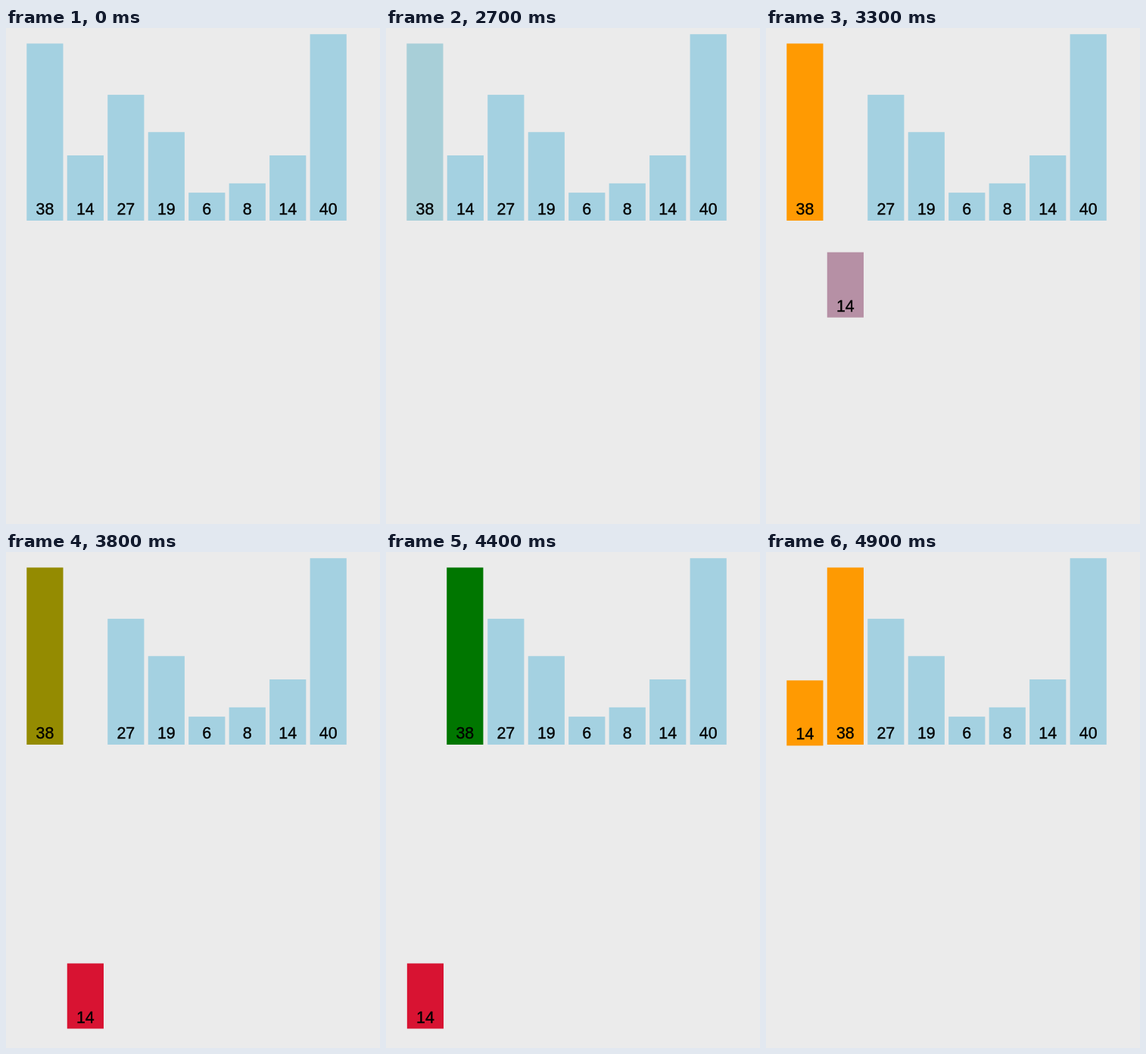
Animation, 494 px wide and 654 px high, one loop 5 s. Source, as an HTML page:

```html
<!DOCTYPE html>
<html lang="en">
<head>
<meta charset="utf-8">
<title>Bar swap</title>
<style>
  html, body { margin: 0; width: 100%; height: 100%; overflow: hidden; background: #ebebeb; }
  svg { display: block; width: 494px; height: 654px; }
  text {
    font: 21.4px "Liberation Sans", Arial, Helvetica, sans-serif;
    text-anchor: middle;
    stroke: #000;
    stroke-width: .35px;
  }
</style>
</head>
<body>
<svg id="stage" viewBox="0 0 494 654"></svg>
<script>
const VALUES = [38, 14, 27, 19, 6, 8, 14, 40];
const LOOP = 5000, TICK = 100, DURATION = 350;
const LEFT = 27.3, STEP = 53.47, WIDTH = 48.2, BASE = 254, UNIT = 6.145, DROP = 374.5;
const BLUE = [164, 209, 225], ORANGE = [255, 154, 2], CRIMSON = [216, 19, 50], GREEN = [0, 118, 0];
const START = { highlight: 2680, drop: 3223, select: 3711, swap: 4096, raise: 4578 };

const svg = document.getElementById('stage');

function add(parent, tag, attrs) {
  const node = document.createElementNS('http://www.w3.org/2000/svg', tag);
  for (const key in attrs) node.setAttribute(key, attrs[key]);
  return parent.appendChild(node);
}

const bars = VALUES.map((value, i) => {
  const group = add(svg, 'g', {});
  const height = value * UNIT;
  const rect = add(group, 'rect', { y: BASE - height, width: WIDTH, height });
  add(group, 'text', { x: WIDTH / 2, y: 246 }).textContent = value;
  const bar = { group, rect };
  place(bar, i, 0, BLUE);
  return bar;
});

function place({ group, rect }, slot, dy, color) {
  group.setAttribute('transform', `translate(${LEFT + slot * STEP} ${dy})`);
  rect.setAttribute('fill', `rgb(${color.map(Math.round)})`);
}

// cubic-bezier(.25, .1, .25, 1), solved for x by bisection
function ease(x) {
  if (x <= 0) return 0;
  if (x >= 1) return 1;
  const bezier = (u, a, b) => 3 * u * (1 - u) ** 2 * a + 3 * u * u * (1 - u) * b + u ** 3;
  let low = 0, high = 1;
  for (let i = 0; i < 24; i++) {
    const mid = (low + high) / 2;
    if (bezier(mid, .25, .25) < x) low = mid; else high = mid;
  }
  return bezier(low, .1, 1);
}

const mix = (from, to, k) => from.map((c, i) => c + (to[i] - c) * k);

function draw(t) {
  const at = name => ease((t - START[name]) / DURATION);
  const raise = at('raise'), drop = at('drop'), swap = at('swap');
  const picked = mix(mix(BLUE, ORANGE, at('highlight')), GREEN, at('select'));
  place(bars[0], swap, 0, mix(picked, ORANGE, raise));
  place(bars[1], 1 - swap, DROP * (drop - raise), mix(mix(BLUE, CRIMSON, drop), ORANGE, raise));
}

const origin = performance.now();
function frame() {
  const t = (performance.now() - origin) % LOOP;
  draw(Math.floor(t / TICK) * TICK);
  requestAnimationFrame(frame);
}
frame();
</script>
</body>
</html>
```
